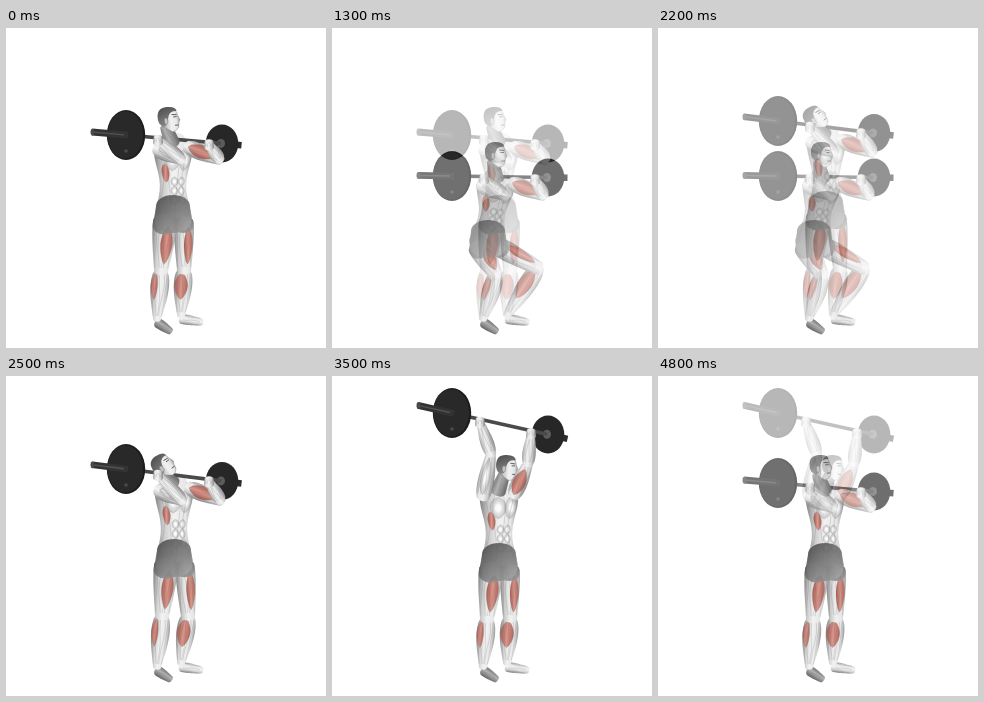
Recreate the animation shown at these times as an HTML page. Size 320 px wide and 320 px high, loop 4.9 s.

```html
<!DOCTYPE html>
<html lang="en">
<head>
<meta charset="utf-8">
<title>Barbell thruster</title>
<style>
  html, body { margin: 0; width: 100%; height: 100%; overflow: hidden; background: #fff; }
  svg { display: block; width: 100%; height: 100%; }
</style>
</head>
<body>
<svg id="stage" viewBox="0 0 320 320">
  <defs>
    <linearGradient id="skin">
      <stop offset="0" stop-color="#808080"/><stop offset=".22" stop-color="#c9c9c9"/>
      <stop offset=".5" stop-color="#f2f2f2"/><stop offset=".8" stop-color="#e6e6e6"/>
      <stop offset="1" stop-color="#979797"/>
    </linearGradient>
    <linearGradient id="shade">
      <stop offset="0" stop-color="#666"/><stop offset=".6" stop-color="#b2b2b2"/>
      <stop offset="1" stop-color="#7c7c7c"/>
    </linearGradient>
    <linearGradient id="red">
      <stop offset="0" stop-color="#a95d52"/><stop offset=".5" stop-color="#d8958a"/>
      <stop offset="1" stop-color="#b4675b"/>
    </linearGradient>
    <linearGradient id="shorts" x2=".7" y2="1">
      <stop offset="0" stop-color="#474747"/><stop offset=".6" stop-color="#757575"/>
      <stop offset="1" stop-color="#969696"/>
    </linearGradient>
    <linearGradient id="hair" x2=".4" y2="1">
      <stop offset="0" stop-color="#4a4a4a"/><stop offset="1" stop-color="#858585"/>
    </linearGradient>
    <radialGradient id="belly">
      <stop offset=".3" stop-color="#fff" stop-opacity=".8"/>
      <stop offset="1" stop-color="#999" stop-opacity=".35"/>
    </radialGradient>
  </defs>
</svg>
<script>
const LOOP = 4900, STEP = 100, FADE_STEPS = 6;
const stage = document.getElementById('stage');

const add = ([x, y], dx, dy) => [x + dx, y + dy];
const mix = (a, b, t) => a.map((v, i) => v + (b[i] - v) * t);
const range = (n, f) => Array.from({ length: n }, (_, i) => f(i / (n - 1)));
const group = (transform, content) => `<g transform="${transform}">${content}</g>`;

// Half width along a limb: linear taper plus a bulge nearer the start
const taper = (start, end, bulge = 0) => t => start + (end - start) * t + bulge * Math.sin(Math.PI * t ** .7);
const spineWidth = t => (16.3 + 3.2 * Math.cos(2 * Math.PI * (t - .1))) * Math.min(1, .65 + 3 * t);

// Body part from a to b. Bellies are lenses [t0, t1, u0, u1, fill]:
// t runs along the part, u across it from -1 to 1.
function part(a, b, half, { fill = 'skin', bellies = [], lines = 5 } = {}) {
  const dx = b[0] - a[0], dy = b[1] - a[1], length = Math.hypot(dx, dy);
  const point = (t, u) => `${(u * half(t)).toFixed(2)},${(t * length).toFixed(2)}`;
  const side = u => range(13, t => point(t, u));
  const cap = t => `A${half(t)} ${half(t) * .65} 0 0 1 `;
  const outline = `M${side(1).join('L')}${cap(1)}${side(-1).reverse().join('L')}${cap(0)}${point(0, 1)}Z`;
  const lens = ([t0, t1, u0, u1, color]) => {
    const edge = dir => range(13, s =>
      point(t0 + (t1 - t0) * s, (u0 + u1) / 2 + dir * (u1 - u0) / 2 * Math.sin(Math.PI * s) ** .6));
    return `<path d="M${edge(1).join('L')}L${edge(-1).reverse().join('L')}Z" fill="url(#${color})"
      stroke="#777" stroke-opacity=".6" stroke-width=".4"/>`;
  };
  const grain = lines && range(lines, s =>
    `M${range(8, t => point(.06 + .88 * t, -.75 + 1.5 * s + .12 * Math.sin(5 * t + 9 * s))).join('L')}`).join('');
  return group(`translate(${a}) rotate(${Math.atan2(-dx, dy) * 180 / Math.PI})`,
    `<path d="${outline}" fill="url(#${fill})"/>` + bellies.map(lens).join('') +
    (lines ? `<path d="${grain}" fill="none" stroke="#666" stroke-opacity=".4" stroke-width=".5"/>` : ''));
}

const BIG_X = 120, SMALL_X = 216;
const barY = ([bigY, smallY], x) => bigY + (x - BIG_X) * (smallY - bigY) / (SMALL_X - BIG_X);

function barbell(bar) {
  const rod = (x1, x2, width, color) =>
    `<path d="M${x1} ${barY(bar, x1)}L${x2} ${barY(bar, x2)}" stroke="${color}" stroke-width="${width}"/>`;
  const disc = (x, rx, ry, fill) => `<ellipse cx="${x}" cy="${barY(bar, x)}" rx="${rx}" ry="${ry}" fill="${fill}"/>`;
  return rod(SMALL_X, 235.5, 6.5, '#2b2b2b') + disc(SMALL_X, 16.3, 19, '#272727') + disc(SMALL_X - 1, 4, 4.5, '#5c5c5c') +
    rod(BIG_X, SMALL_X - 1, 3.6, '#4a4a4a') +
    disc(BIG_X, 19.2, 25, '#1c1c1c') + disc(BIG_X - .7, 17.8, 23.6, '#292929') +
    rod(86, 122, 6.8, '#333') + rod(86, 118, 1.4, '#525252') + disc(86.5, 2, 3.4, '#4a4a4a') +
    `<circle cx="120" cy="${bar[0] + 16}" r="1.8" fill="#4a4a4a"/>`;
}

const head = ([x, y], tilt) => group(`translate(${x} ${y}) rotate(${tilt})`, `
  <path d="M1-12Q10-10 10-4L12 1Q10 3 10 8Q7 13 3 12L-6 6Z" fill="url(#skin)" stroke="#888" stroke-width=".5"/>
  <path d="M-10-1Q-11-13 0-13Q9-13 9.5-8Q3-9 1-4L-2 5Q-9 7-10-1Z" fill="url(#hair)"/>
  <ellipse cx="-2" cy="1" rx="1.8" ry="3.2" fill="#c4c4c4" stroke="#777" stroke-width=".5"/>
  <path d="M4-5L9-4.5M5.5-2.5H9M6.5 6H10" stroke="#555" stroke-width=".9"/>`);

function arm(shoulder, elbow, hand, bellies) {
  return part(shoulder, elbow, taper(6.5, 5, 2.2), { bellies }) +
    part(elbow, hand, taper(5, 3.6, 2.2)) +
    part(add(hand, 0, 3), add(hand, 0, -2), taper(5, 4.5), { lines: 4 });
}

function leg(hip, knee, ankle, toe, width, thighBelly, calfBelly, footFill) {
  return part(add(ankle, 1, 4), toe, taper(5, 3.6, .5), { fill: footFill, lines: 3 }) +
    part(knee, ankle, taper(6.5, 4, 3.6), { bellies: [calfBelly] }) +
    part(hip, knee, taper(width, 7, 1), { bellies: [thighBelly] });
}

const abs = [.48, .6, .72].flatMap(t => [[t, t + .12, -.15, .37, 'belly'], [t, t + .12, .4, .85, 'belly']]);
const chestBellies = [[.12, .4, -.5, .4, 'belly'], [.1, .4, .35, .98, 'belly'], [.31, .55, -.75, -.25, 'red'], ...abs];
const deltoid = [[0, .82, -.75, .85, 'red']];
const nearAnkle = [151, 291], farAnkle = [175, 287];

function figure({ bar, headAt, tilt, chest, hips, nearKnee = [155, 243], farKnee = [178, 242], overhead }) {
  const nearHip = add(hips, -8, 5), farHip = add(hips, 11, 5);
  const nearHand = [overhead ? 148 : 152, barY(bar, 150) + 2];
  const farHand = [overhead ? 199 : 203, barY(bar, 201) + 2];
  const nearElbow = overhead ? add(chest, -8, -46) : add(chest, 9, 8);
  const farElbow = overhead ? add(chest, 29, -36) : add(chest, 47, 8);
  const hem = (hip, knee, width) => part(hip, mix(hip, knee, .1), taper(width, width), { fill: 'shorts', lines: 0 });
  return part(add(chest, 0, -12), hips, spineWidth, { bellies: chestBellies, lines: 4 }) +
    leg(farHip, farKnee, farAnkle, [195, 294], 9.5, [.12, .88, 0, .92, 'red'], [.06, .66, -.92, .5, 'red'], 'skin') +
    leg(nearHip, nearKnee, nearAnkle, [164, 303], 12, [.1, .86, -.25, .85, 'red'], [.05, .6, -.96, -.25, 'red'], 'shade') +
    `<g opacity=".88">${hem(farHip, farKnee, 9.5)}${hem(nearHip, nearKnee, 12)}` +
    part(add(hips, 0, -11), add(hips, 0, 4), taper(17, 18.5), { fill: 'shorts', lines: 3 }) + '</g>' +
    barbell(bar) +
    part(add(chest, -1, -9), add(headAt, -2, 7), taper(8, 6), { fill: 'shade', lines: 3 }) + head(headAt, tilt) +
    arm(add(chest, 15, -5), farElbow, farHand, deltoid) +
    arm(add(chest, -16, -3), nearElbow, nearHand, [[.05, .9, -.4, .7, 'belly']]);
}

const stand = figure({ bar: [107, 115.5], headAt: [162, 92], tilt: -6, chest: [167, 124], hips: [167, 189] });
const squat = figure({ bar: [148, 149.5], headAt: [163, 127], tilt: 0, chest: [165, 160], hips: [156, 214],
  nearKnee: [164, 247], farKnee: [206, 240] });
const drive = figure({ bar: [93, 105], headAt: [157, 91], tilt: -35, chest: [168, 117], hips: [168, 185],
  nearKnee: [156, 240], farKnee: [182, 240] });
const press = figure({ bar: [37, 58.5], headAt: [174, 92], tilt: 3, chest: [167, 124], hips: [167, 189], overhead: true });

// Each opaque layer fades in over the previous ones.
const layers = [[-Infinity, stand], [1000, squat], [2000, drive], [3000, press], [4500, stand]]
  .map(([start, content]) => {
    stage.insertAdjacentHTML('beforeend', `<g><rect width="320" height="320" fill="#fff"/>${content}</g>`);
    return { start, node: stage.lastElementChild };
  });

const origin = performance.now();
function render(now) {
  const time = Math.max(0, now - origin) % LOOP;
  for (const { start, node } of layers) {
    const step = Math.floor((time - start) / STEP) + 1;
    node.setAttribute('opacity', Math.max(0, Math.min(1, step / FADE_STEPS)));
  }
  requestAnimationFrame(render);
}
render(origin);
</script>
</body>
</html>
```
